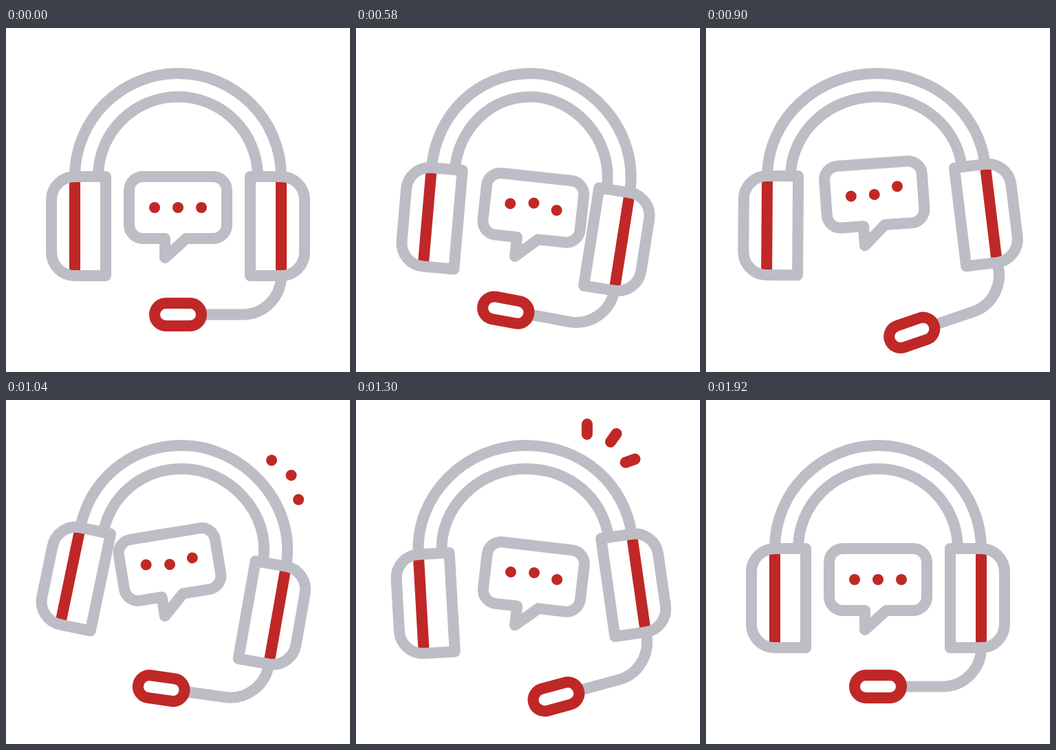
An HTML page that plays this animation: 500x500 px, repeating every 2 s.

```html
<!DOCTYPE html>
<html lang="en">
<head>
<meta charset="utf-8">
<title>Headset</title>
<style>
  html, body { margin: 0; width: 100%; height: 100%; overflow: hidden; background: #fff; }
  svg { display: block; width: 100%; height: 100%; }
  .line { fill: none; stroke: #bdbdc6; stroke-width: 16; stroke-linejoin: round; }
  .accent { fill: none; stroke: #bf2826; stroke-width: 16; }
  .dot { fill: #bf2826; }
  #sparks { stroke-linecap: round; }
</style>
</head>
<body>
<svg viewBox="0 0 500 500">
  <path id="outer" class="line"/>
  <path id="inner" class="line"/>
  <g id="arm">
    <path class="line" d="M400 356V360C400 391 375 416.5 344 416.5H288"/>
    <rect class="accent" x="216" y="400" width="68" height="33" rx="16.5"/>
  </g>
  <g id="left">
    <path class="accent" d="M100 220V356"/>
    <path class="line" d="M145 216H100a34 34 0 0 0-34 34V326a34 34 0 0 0 34 34H145Z"/>
  </g>
  <g id="right">
    <path class="accent" d="M400 220V356"/>
    <path class="line" d="M355 216H400a34 34 0 0 1 34 34V326a34 34 0 0 1-34 34H355Z"/>
  </g>
  <g id="bubble">
    <path class="line" d="M199 216H301a20 20 0 0 1 20 20V286a20 20 0 0 1-20 20H262L231 334V306H199a20 20 0 0 1-20-20V236a20 20 0 0 1 20-20Z"/>
    <circle class="dot" cx="216" cy="261" r="8"/>
    <circle class="dot" cx="250" cy="261" r="8"/>
    <circle class="dot" cx="284" cy="261" r="8"/>
  </g>
  <path id="sparks" class="accent"/>
</svg>
<script>
const LOOP = 2000, STEP = 20, RAD = Math.PI / 180, CURVE = 0.552;
const $ = id => document.getElementById(id);
const dots = [...document.querySelectorAll('.dot')];

// Each track is a list of [time, value] turning points.
const tracks = {
  left: [[180, 0], [265, -13], [510, 8], [780, -11.6], [1020, 12.4], [1215, -12], [1375, 4], [1500, 0]],
  right: [[180, 0], [290, -15.5], [570, 9], [855, -9.5], [1045, 10], [1240, -13.5], [1400, 4], [1520, 0]],
  arm: [[180, 0], [340, -19.2], [665, 16], [910, -19], [1080, 12], [1275, -16.5], [1430, 5], [1560, 0]],
  tilt: [[180, 0], [380, 6.2], [700, 6.2], [1030, -9.3], [1310, 6.7], [1600, 6], [1800, 1], [1900, 0]],
  skew: [[1600, 0], [1780, -9], [1910, 0]],
  lift: [[460, 0], [1020, -20], [1480, 0]],
  sparkEnd: [[1020, 0], [1200, 1], [1340, 18]],
  sparkStart: [[1320, 0], [1460, 18]]
};

// Angle round the headset, distance from its centre, direction of each spark.
const sparks = [[-54, 187, -81], [-43.6, 196, -46], [-32.8, 189, -11]];

function at(name, t) {
  const keys = tracks[name];
  const i = keys.findIndex(k => k[0] > t);
  if (i === 0) return keys[0][1];
  if (i < 0) return keys[keys.length - 1][1];
  const [t0, a] = keys[i - 1], [t1, b] = keys[i];
  return a + (b - a) * (1 - Math.cos(Math.PI * (t - t0) / (t1 - t0))) / 2;
}

function turn(x, y, angle, shift) {
  const c = Math.cos(angle * RAD), s = Math.sin(angle * RAD);
  return [250 + shift + (x - 250) * c - (y - 216) * s, 216 + (x - 250) * s + (y - 216) * c];
}

// One side of the band: its end on the cup and the handles towards the top.
function side(x, top, topX, angle, shift) {
  const [px, py] = turn(x, 216, angle, shift);
  const h = CURVE * (py - top);
  return {
    end: [px, py],
    handle: [px + h * Math.sin(angle * RAD), py - h * Math.cos(angle * RAD)],
    crown: [topX + CURVE * (px - topX), top]
  };
}

function band(r, topX, l, lShift, rt, rShift) {
  const top = 216 - r;
  const a = side(250 - r, top, topX, l, lShift);
  const b = side(250 + r, top, topX, rt, rShift);
  return `M${a.end}C${a.handle} ${a.crown} ${topX},${top}C${b.crown} ${b.handle} ${b.end}`;
}

function sparkPath(t, angle) {
  if (t < 1020 || t >= 1460) return '';
  const from = at('sparkStart', t), to = at('sparkEnd', t) + 0.01;
  return sparks.map(([pos, dist, dir]) => {
    const p = (pos + angle) * RAD, d = (dir + angle) * RAD;
    const point = n => [
      250 + dist * Math.cos(p) + n * Math.cos(d),
      216 + dist * Math.sin(p) + n * Math.sin(d)
    ];
    return `M${point(from)}L${point(to)}`;
  }).join('');
}

function hop(t, i) {
  let y = 0;
  for (const peak of [420 + 245 * i, 1155 + 245 * i]) {
    const d = Math.abs(t - peak);
    if (d < 240) y -= 9.5 * (1 + Math.cos(Math.PI * d / 240)) / 2;
  }
  return y;
}

function draw(t) {
  const l = at('left', t), r = at('right', t), arm = at('arm', t);
  // The cups drift with the swing and spread when they are out of step.
  const drift = 0.65 * (l + r) / 2, spread = 1.2 * (l - r);
  const lShift = drift - spread, rShift = drift + spread;
  const topX = 250 + drift;

  $('outer').setAttribute('d', band(150, topX, l, lShift, r, rShift));
  $('inner').setAttribute('d', band(116, topX, l, lShift, r, rShift));
  $('left').setAttribute('transform', `translate(${lShift}) rotate(${l} 250 216)`);
  $('right').setAttribute('transform', `translate(${rShift}) rotate(${r} 250 216)`);

  const [jx, jy] = turn(400, 360, r, rShift);
  $('arm').setAttribute('transform', `translate(${jx} ${jy}) rotate(${arm}) translate(-400 -360)`);

  $('bubble').setAttribute('transform',
    `translate(231 ${334 + at('lift', t)}) rotate(${at('tilt', t)}) skewX(${at('skew', t)}) translate(-231 -334)`);
  dots.forEach((dot, i) => dot.setAttribute('cy', 261 + hop(t, i)));
  $('sparks').setAttribute('d', sparkPath(t, r * 1.07));
}

const start = performance.now();
function tick() {
  const t = (performance.now() - start) % LOOP;
  draw(Math.floor(t / STEP) * STEP);
  requestAnimationFrame(tick);
}
tick();
</script>
</body>
</html>
```
